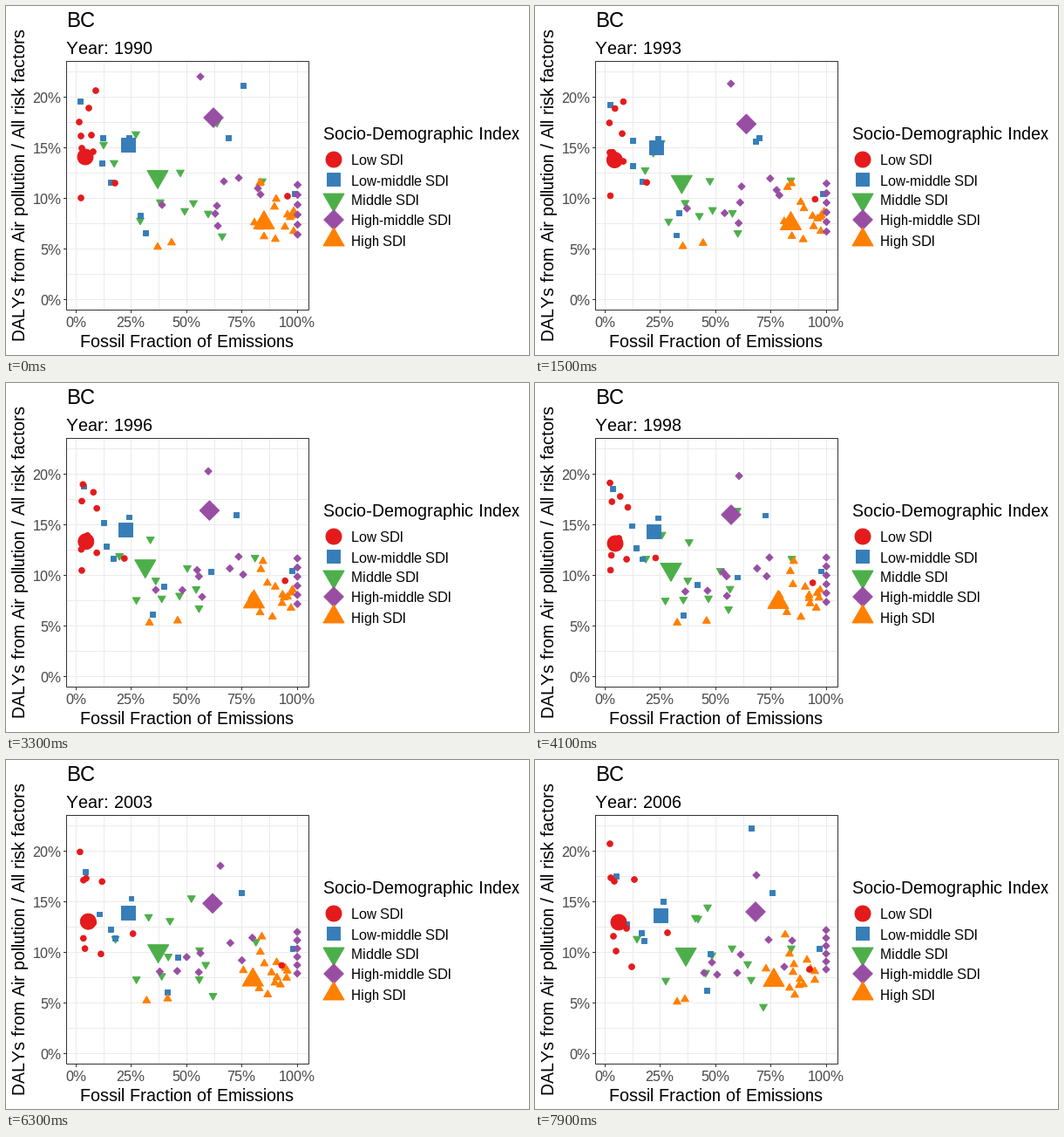
Animation, 600 px wide and 400 px high, one loop 8 s. Source, as a matplotlib script:

```python
import numpy as np
import matplotlib.pyplot as plt
from matplotlib.animation import FuncAnimation
from matplotlib.collections import PolyCollection

W, H, DPI = 600, 400, 100
TICK, HOLD, STEP, LOOP = 100, 500, 200, 8000
LAST = (LOOP - HOLD) // STEP + 1
YEARS_PER_STEP = 29 / 69
SMALL, BIG = 3.32, 9.0
LEFT, RIGHT, TOP, BOTTOM = 69.5, 347.5, 63.5, 348.5

# whole-pixel glyph advances without kerning
plt.rcParams.update({
    "font.family": "Liberation Sans",
    "text.hinting": "native",
    "text.hinting_factor": 1,
    "text.kerning_factor": 8,
})
rng = np.random.default_rng(7)

fig = plt.figure(figsize=(W / DPI, H / DPI), dpi=DPI, facecolor="white")
ax = fig.add_axes([0, 0, 1, 1])
ax.set(xlim=(0, W), ylim=(H, 0))
ax.axis("off")


def pt(px):
    return px * 72 / DPI


def ngon(n, radius, turn):
    a = np.radians(turn) + np.arange(n) * 2 * np.pi / n
    return radius * np.column_stack([np.cos(a), np.sin(a)])


# colour, outline, yearly sideways sway in pixels
KINDS = {
    "Low": ("#E41A1C", ngon(40, 1, 0), 0.7),
    "Low-middle": ("#377EB8", ngon(4, 1.2533, 45), 1),
    "Middle": ("#4DAF4A", ngon(3, 1.5551, 90) - (0, 0.39), 3),
    "High-middle": ("#984EA3", ngon(4, 1.2533, 0), 3),
    "High": ("#FF7F00", ngon(3, 1.5551, -90) + (0, 0.39), 1.5),
}
paths = {kind: [] for kind in KINDS}
steps = np.arange(LAST + 1)
u = steps / LAST


def lead(kind, xs, ys):
    """Large marker through evenly spaced key points."""
    track = [np.interp(u, np.linspace(0, 1, len(v)), v) for v in (xs, ys)]
    paths[kind].append((BIG, np.column_stack(track)))


def drift(x0, y0, x1, y1, dx=0, dy=0, sway=0):
    """Start to end, bowed by (dx, dy) midway, swaying a little each year."""
    bow = np.sin(np.pi * u)
    nodes = np.linspace(0, 1, 17)
    wobble = np.interp(u, nodes, rng.normal(0, sway, 17) * (nodes % 1 > 0))
    return np.column_stack([x0 + (x1 - x0) * u + dx * bow + wobble,
                            y0 + (y1 - y0) * u + dy * bow])


def crowd(kind, *rows):
    for row in rows:
        paths[kind].append((SMALL, drift(*row, sway=KINDS[kind][2])))


lead("Low", [91, 92, 96], [173, 184, 186])
crowd("Low",
      (323, 218, 315, 240), (125, 203, 152, 198), (86, 220, 93, 219, -2, -5),
      (95, 117, 86, 96, -4, 8), (103, 97, 87, 135, 3, 14),
      (84, 133, 91, 139), (98, 148, 114, 137), (86, 149, 90, 202, -1, 22),
      (100, 167, 111, 237), (87, 163, 105, 193))

lead("Low-middle", [140, 139, 136, 139, 144], [159, 170, 178])
crowd("Low-middle",
      (85, 109, 93, 133), (272, 91, 248, 78, -29, 138),
      (255, 151, 272, 152, 2), (331, 215, 326, 216),
      (111, 151, 105, 188, 3, -6), (141, 151, 147, 162, -3, -2),
      (110, 180, 122, 198), (120, 202, 125, 207, 1, -3),
      (154, 240, 201, 222, 9), (160, 260, 197, 264, -8, 4))

lead("Middle", [174, 165, 156, 175, 173], [199, 217, 226])
crowd("Middle",
      (242, 135, 198, 170, 9, -5), (149, 148, 184, 182, -22, 10),
      (112, 160, 187, 183, 27, 12), (124, 181, 117, 206, 9, 9),
      (294, 202, 294, 217, -7, -7), (248, 265, 262, 284, -32, -14),
      (154, 247, 150, 254, -2), (200, 192, 226, 217, 2, 12),
      (232, 239, 244, 235, -20), (215, 227, 248, 253, -28, 8),
      (205, 236, 196, 245, -28, 9), (177, 226, 203, 225, -15, 2))

lead("High-middle", [238, 245, 225, 234, 253], [128, 151, 174])
crowd("High-middle",
      (223, 81, 254, 132, -4), (243, 252, 232, 244, -18, -4),
      (267, 197, 295, 207, -10, -2), (179, 228, 194, 244, -15, 3),
      (240, 238, 209, 246, -30, -4), (242, 229, 203, 232, -5, -9),
      (250, 201, 236, 223, -25, 5), (289, 209, 268, 206, -24, 5),
      (292, 216, 286, 237, -21, -5))
# column along the 100% line
for y0, y1 in zip(np.linspace(205, 262, 6), np.linspace(195, 240, 6)):
    paths["High-middle"].append((SMALL, drift(334.5, y0, 334, y1)))

lead("High", [296, 292, 279, 285, 274], [245, 248, 249])
crowd("High",
      (174, 275, 163, 276, -6, -2), (190, 270, 172, 273, 15),
      (292, 201, 287, 199, 8, 3), (291, 202, 292, 221, 0, 3),
      (310, 220, 297, 233, -6, 3), (308, 229, 312, 228, 0, 4),
      (309, 266, 298, 268), (296, 263, 292, 260, -4),
      (285, 247, 265, 238, 5), (292, 252, 276, 254, -6),
      (330, 257, 308, 256, 5), (320, 252, 303, 257, 4, -3),
      (330, 234, 316, 238, 4), (323, 238, 296, 242, 4, 2),
      (328, 239, 321, 251), (330, 238, 321, 241), (326, 241, 304, 250, 3))


def label(x, y, s, px, color="black", **kw):
    return ax.text(x, y, s, fontsize=pt(px), color=color, va="baseline", **kw)


def line(xs, ys, color):
    ax.plot(xs, ys, color=color, lw=pt(1), snap=False, zorder=1,
            solid_capstyle="butt", solid_joinstyle="miter")


def px_x(pct):
    return np.floor(80.3 + 2.54 * pct) + 0.5


def px_y(pct):
    return np.floor(336.4 - 11.6 * pct) + 0.5


GRID, FRAME, TICKTEXT = "#EBEBEB", "#333333", "#4D4D4D"
for pct in np.arange(0, 101, 12.5):
    line([px_x(pct)] * 2, [TOP, BOTTOM], GRID)
for pct in np.arange(0, 23, 2.5):
    line([LEFT, RIGHT], [px_y(pct)] * 2, GRID)
for pct in range(0, 101, 25):
    x = px_x(pct)
    line([x, x], [BOTTOM, BOTTOM + 3.5], FRAME)
    label(x - 0.5, 368, f"{pct}%", 17.33, TICKTEXT, ha="center")
for pct in range(0, 21, 5):
    y = px_y(pct)
    line([LEFT - 3.5, LEFT], [y, y], FRAME)
    label(63.5, y + 6.3, f"{pct}%", 17.33, TICKTEXT, ha="right")
line([LEFT, RIGHT, RIGHT, LEFT, LEFT], [TOP, TOP, BOTTOM, BOTTOM, TOP], FRAME)

label(69, 24, "BC", 24)
year = label(69, 55, "", 20)
label(207.5, 391, "Fossil Fraction of Emissions", 20, ha="center")
label(22, 205.5, "DALYs from Air pollution / All risk factors", 20,
      ha="center", rotation=90, rotation_mode="anchor")
label(364, 153, "Socio-Demographic Index", 20)


def marker_set(color, z):
    coll = PolyCollection([], fc=color, ec=color, lw=pt(0.95),
                          joinstyle="miter", zorder=z)
    ax.add_collection(coll, autolim=False)
    return coll


for i, (kind, (color, shape, _)) in enumerate(KINDS.items()):
    y = 175.5 + 23 * i
    # legend triangles sit on their centroid, not on their box
    centroid = shape.mean(axis=0)
    marker_set(color, 3).set_verts([(shape - centroid) * BIG + (375.5, y)])
    label(396, y + 7, f"{kind} SDI", 16)

ORDER = ["Middle", "Low-middle", "High", "High-middle", "Low"]
marks = {kind: marker_set(KINDS[kind][0], 4 + z) for z, kind in enumerate(ORDER)}


def draw(i):
    t = i * TICK
    step = 0 if t < HOLD else (t - HOLD) // STEP + 1
    year.set_text(f"Year: {round(1990 + step * YEARS_PER_STEP)}")
    for kind, coll in marks.items():
        shape = KINDS[kind][1]
        coll.set_verts([shape * r + track[step] for r, track in paths[kind]])
    return [year, *marks.values()]


anim = FuncAnimation(fig, draw, frames=LOOP // TICK, interval=TICK,
                     repeat=True, repeat_delay=0, blit=False)
plt.show()
```
